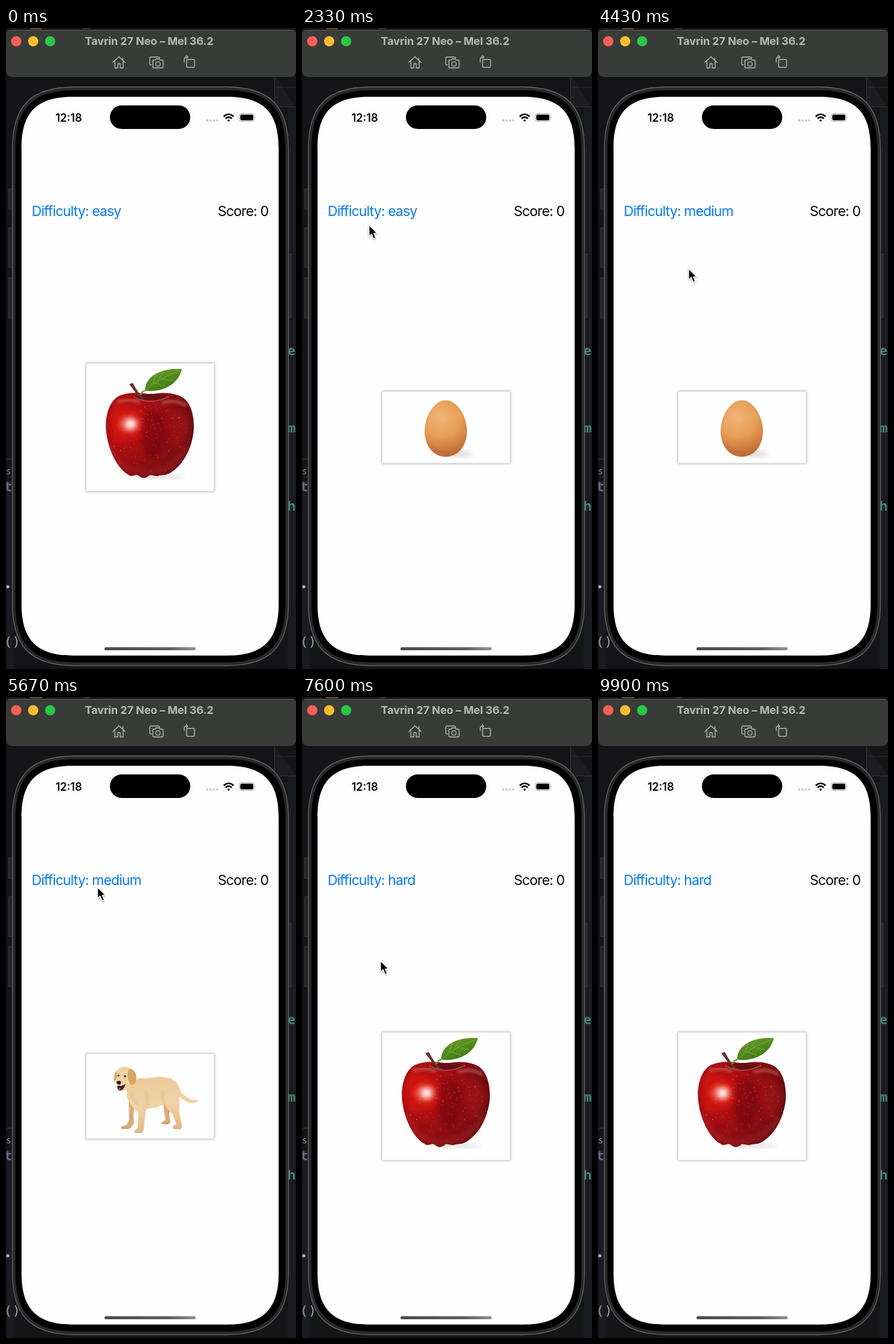
An HTML page for the animation above (9.93 s loop, 480 by 1060 pixels).

```html
<!DOCTYPE html>
<html lang="en">
<head>
<meta charset="utf-8">
<title>Card game in a phone simulator</title>
<style>
  html, body { margin: 0; width: 100%; height: 100%; overflow: hidden; background: #151517; }
  svg { display: block; width: 100%; height: 100%; }
  text { font-family: Inter, Roboto, sans-serif; white-space: pre; }
  .code text { font: 600 22px "Noto Sans Mono", "DejaVu Sans Mono", monospace; }
  .label { font-size: 23px; letter-spacing: -.039em; }
  .item { font-size: 18px; letter-spacing: -.036em; fill: #111; }
  .icon { fill: none; stroke: #b9bab9; stroke-width: 1.4; stroke-linejoin: round; stroke-linecap: round; }
</style>
</head>
<body>
<svg viewBox="0 0 480 1060" preserveAspectRatio="none">
  <defs>
    <radialGradient id="appleSkin" gradientUnits="userSpaceOnUse" cx="200" cy="652" r="116">
      <stop offset="0" stop-color="#cc1614"/><stop offset=".3" stop-color="#b01013"/>
      <stop offset=".65" stop-color="#8f0d12"/><stop offset="1" stop-color="#650d10"/>
    </radialGradient>
    <linearGradient id="leafSkin" x1="0" y1="0" x2=".6" y2="1">
      <stop offset="0" stop-color="#6f9f2a"/><stop offset="1" stop-color="#3d7a14"/>
    </linearGradient>
    <radialGradient id="eggSkin" gradientUnits="userSpaceOnUse" cx="231" cy="645" r="62">
      <stop offset="0" stop-color="#f1b57b"/><stop offset=".5" stop-color="#e79e55"/>
      <stop offset="1" stop-color="#c06b34"/>
    </radialGradient>
    <linearGradient id="coat" x1="0" y1="0" x2=".2" y2="1">
      <stop offset="0" stop-color="#ecc794"/><stop offset=".55" stop-color="#f1d4aa"/>
      <stop offset="1" stop-color="#e3b983"/>
    </linearGradient>
    <linearGradient id="homeBar">
      <stop offset="0" stop-color="#4b4b4b"/><stop offset=".7" stop-color="#5f5f5f"/><stop offset="1" stop-color="#929292"/>
    </linearGradient>
    <filter id="soft" x="-50%" y="-50%" width="200%" height="200%"><feGaussianBlur stdDeviation="4"/></filter>
    <filter id="edge" x="-10%" y="-10%" width="120%" height="120%"><feGaussianBlur stdDeviation="2.2"/></filter>
    <filter id="glow" filterUnits="userSpaceOnUse" x="-120" y="170" width="600" height="460"><feGaussianBlur stdDeviation="36"/></filter>
    <filter id="cursorShade" x="-50%" y="-50%" width="200%" height="200%">
      <feDropShadow dx="0" dy="1.2" stdDeviation="1" flood-opacity=".4"/>
    </filter>
    <clipPath id="screenShape"><use href="#screen"/></clipPath>
    <clipPath id="appleShape"><use href="#appleBody"/></clipPath>
  </defs>

  <!-- Desktop behind the simulator -->
  <rect width="480" height="1060" fill="#151517"/>
  <path d="M0 750H12V1060H0zM466 130H480V1060H466z" fill="#1a1c22"/>
  <path d="M40 0h19v2h-19z" fill="#704820"/><path d="M127 0h11v1.5h-11z" fill="#3c3d40"/>
  <path d="M444.500 81V130.500H480M444.500 98H480" fill="#1d1d20" stroke="#323235"/>
  <path d="M14 266H4.500V300H14M14 330.500H4.500V396H14M14 413H4.500V479H14M464 374H472V479H464" fill="#242426" stroke="#3d3d40"/>
  <path d="M0 713H12M0 750.500H12" stroke="#38383b"/>
  <g class="code">
    <text x="0" y="738" style="font-size:14px;font-weight:400" fill="#99999c">s</text>
    <text x="-3" y="766" fill="#75608f">t</text>
    <circle cx="3" cy="924" r="2.600" fill="#b8b8bb"/>
    <text x="-3" y="1022" fill="#a3a3a6" style="font-weight:400">()</text>
    <g fill="#4c8574"><text x="466" y="541">e</text><text x="466" y="669">m</text><text x="466" y="798">h</text></g>
  </g>

  <!-- Title bar -->
  <path d="M0 8Q2 3 9 3H471Q478 3 480 8V72Q479 81 469 81H11Q1 81 0 72Z" fill="#393b38"/>
  <path d="M4 4Q6 3.500 10 3.500H470Q474 3.500 476 4" fill="none" stroke="#5d5e5d"/>
  <circle cx="17" cy="22" r="8.500" fill="#ff5f57"/>
  <circle cx="45" cy="22" r="8.500" fill="#febc2e"/>
  <circle cx="73" cy="22" r="8.500" fill="#28c840"/>
  <text x="237" y="28" text-anchor="middle" font-size="18" font-weight="700" letter-spacing="-.1" fill="#b7b8b7">Tavrin 27 Neo – Mel 36.2</text>
  <g class="icon">
    <path d="M177 57L187 47.500 197 57M180 55V66H185V59H189V66H194V55M193.500 53V49"/>
    <path d="M241 61H240Q238 61 238 59V50Q238 48 240 48H252Q254 48 254.500 50M245 53H247L248.500 51H253.500L255 53H258Q260 53 260 55V64Q260 66 258 66H245Q243 66 243 64V55Q243 53 245 53Z"/>
    <circle cx="251.500" cy="59.500" r="3.700"/>
    <rect x="299" y="52" width="13" height="13" rx="2"/><path d="M295 56V52Q295 48 299 48H301M298.500 45.500L301 48 298.500 50.500"/>
  </g>

  <!-- Phone -->
  <path id="frame" fill="#292a2b" stroke="#656666" stroke-width="1.300"/>
  <path id="bezel" stroke="#161616"/>
  <path id="screen" fill="#fefefe"/>
  <rect x="172" y="128" width="133" height="39" rx="19.500"/>
  <text x="82" y="154.500" font-size="18" font-weight="600">12:18</text>
  <g fill="#c9c9c9"><circle cx="333" cy="153" r="1.900"/><circle cx="338.600" cy="153" r="1.900"/><circle cx="344.200" cy="153" r="1.900"/><circle cx="349.800" cy="153" r="1.900"/></g>
  <g fill="none" stroke="#000" stroke-width="2.500">
    <path d="M360.200 146.500Q368.500 139 376.800 146.500M363.200 149.800Q368.500 145 373.800 149.800"/>
    <path d="M366 152.500Q368.500 150.500 371 152.500L368.500 155Z" fill="#000" stroke="none"/>
  </g>
  <rect x="386" y="141.500" width="25" height="13" rx="4" fill="none" stroke="#aaa"/>
  <rect x="387.700" y="143.200" width="21.600" height="9.600" rx="2.700"/>
  <path d="M412.500 146Q414.500 148 412.500 150Z" fill="#aaa"/>
  <rect x="163" y="1024" width="151" height="5" rx="2.500" fill="url(#homeBar)"/>
  <text class="label" x="350.500" y="311">Score: 0</text>

  <!-- Cards -->
  <rect id="cardShade" x="132" width="213" fill="#000" opacity=".3" filter="url(#edge)"/>
  <rect id="cardFace" x="133" width="211" fill="#fefefe"/>

  <g class="picture">
    <ellipse cx="252" cy="742" rx="44" ry="2.500" fill="#777" opacity=".35" filter="url(#soft)"/>
    <path id="appleBody" fill="url(#appleSkin)" d="M239 606C220 602 202 602 188 608C171 616 164 641 165.500 664C168 696 184 729 203 739C209 744 214 737 219 740C226 746 232 745 237 740C242 738 247 743 254 740C262 739 267 739 273 735C295 721 309 692 311 662C311.500 636 304 613 284 607C269 602 254 603 239 606Z"/>
    <g clip-path="url(#appleShape)">
      <path d="M222 640C236 626 252 630 262 646C268 672 262 704 240 716C224 700 216 664 222 640Z" fill="#5a060b" opacity=".4" filter="url(#soft)"/>
      <path d="M272 632C290 628 303 640 304 662C301 682 292 696 280 700C276 676 270 650 272 632Z" fill="#b51a1b" opacity=".4" filter="url(#soft)"/>
      <path d="M183 620C172 636 170 664 180 688L226 676 230 636Z" fill="#e0170f" opacity=".5" filter="url(#soft)"/>
      <path d="M172 690C184 724 202 734 222 734C250 738 282 728 300 692" fill="none" stroke="#bb3236" stroke-width="9" opacity=".4" filter="url(#soft)"/>
      <ellipse cx="204" cy="655" rx="17" ry="14" fill="#ff8070" opacity=".6" filter="url(#soft)"/>
      <ellipse cx="206" cy="655" rx="9" ry="8" fill="#fff" opacity=".95" filter="url(#soft)"/>
      <path d="M184 618Q207 611 222 619M258 620Q281 613 299 625" fill="none" stroke="#f0a598" stroke-width="5" opacity=".4" filter="url(#edge)"/>
      <g id="speckles" fill="#f0a58c"/>
    </g>
    <ellipse cx="240" cy="611" rx="28" ry="6" fill="#671014"/>
    <path d="M211 610Q240 625 270 609" fill="none" stroke="#c9685a" stroke-width="2" opacity=".6"/>
    <path d="M204 589L210 587Q217 602 230 615L224 614Q214 603 204 589Z" fill="#663034"/>
    <path d="M222 607Q224 602 231 599" fill="none" stroke="#6f9c2c" stroke-width="2.400"/>
    <path d="M230 600C230 578 252 562 291 564C287 584 266 603 230 600Z" fill="url(#leafSkin)"/>
    <path d="M230 600Q249 581 288 566M243 588L248 573M254 579L261 568M246 587L263 592M257 580L276 583" fill="none" stroke="#a0cb5f" opacity=".5"/>
  </g>

  <g class="picture">
    <ellipse cx="262" cy="704" rx="20" ry="4" fill="#8a8088" opacity=".35" filter="url(#soft)"/>
    <path fill="url(#eggSkin)" d="M238 615.500C257 615.500 273 642 273 666C273 692 258 709 238 709C218 709 203 692 203 666C203 642 219 615.500 238 615.500Z"/>
    <path d="M206 681C212 698 224 707 239 708C250 708 260 702 266 692C251 704 224 703 206 681Z" fill="#b56843" opacity=".4" filter="url(#edge)"/>
  </g>

  <g class="picture">
    <g fill="#d9ac77">
      <path d="M203 666L213 668 211 692 212 704 206 713Q196 716 190 713 190 709 199 708L204 700Z"/>
      <path d="M260 670L276 676 270 688 272 704 267 707Q258 707 257 704L264 699 262 687Z"/>
    </g>
    <path fill="url(#coat)" d="M200 646C210 640 214 632 222 630C240 632 249 626 263 629C278 630 287 640 289 652C296 662 307 667 318 667C318 671 306 673 298 669L287 661C289 673 285 679 287 688L291 708Q292 713 288 714L278 714Q274 712 277 709L282 706 276 690Q267 682 262 673C251 680 241 680 232 681L229 704 228 717Q224 722 213 720 212 716 218 713L219 689C213 680 204 674 200 662Z"/>
    <path d="M181 624C183 615 190 611 199 612C208 613 213 619 213 628C213 635 211 640 207 647L194 651Q184 650 183 643Z" fill="#f1d1a1"/>
    <path d="M203 616C210 613 216 621 216 631Q214 642 207 642Q201 633 201 624ZM182 618Q178 625 179 636Q183 635 184 624Z" fill="#d9a565"/>
    <path d="M183 637Q187 633 193 638L195 646 190 650 184 648Z" fill="#f5dfc0"/>
    <path d="M182.500 637Q184 634 189 635 192 637 189 641 185 642 182.500 637Z" fill="#211a1a"/>
    <path d="M184 643L191 643 198 640Q195 650 189 651 184 650 184 643Z" fill="#4a2020"/>
    <path d="M185.500 647.500L189.500 647 189 650Z" fill="#c9787a"/>
    <circle cx="186" cy="626" r="1.500" fill="#31201a"/><circle cx="197" cy="627" r="1.700" fill="#31201a"/>
    <path d="M230 652Q240 674 228 681M261 650Q257 664 264 675M208 655Q211 668 220 676" fill="none" stroke="#c8985d" stroke-width="3" opacity=".35" filter="url(#edge)"/>
    <path d="M190 713h15M213 720h14M257 705h13M277 714h13" stroke="#9b7658" opacity=".6"/>
  </g>

  <text class="label" id="difficulty" x="42.500" y="311"></text>

  <g clip-path="url(#screenShape)">
    <g id="menu">
      <rect x="14" y="305.500" width="305" height="179.500" rx="33" opacity=".11" filter="url(#glow)"/>
      <rect x="34" y="325.500" width="265" height="139.500" rx="13" fill="#f5f6f6"/>
      <path d="M34 372H299M34 418.500H299" stroke="#d9dada"/>
      <text class="item" x="51" y="355.500">Easy</text>
      <text class="item" x="51" y="402">Medium</text>
      <text class="item" x="51" y="448.500">Hard</text>
    </g>
  </g>

  <g id="cursor" filter="url(#cursorShade)">
    <path d="M0 0V18.500L4.300 14.500 7.500 22.300 11 20.800 7.800 13.300H13.200Z" stroke="#fff" stroke-width="1.300" stroke-linejoin="round"/>
  </g>
</svg>
<script>
const LOOP = 9930;
const $ = id => document.getElementById(id);
const pictures = [...document.querySelectorAll('.picture')];   // apple, egg, dog
const deck = [
  { picture: pictures[0], height: 211 },
  { picture: pictures[2], height: 140 },
  { picture: pictures[1], height: 118 },
];
// The card timer restarts whenever a level is chosen.
const levels = [
  { name: 'easy', from: -200, period: 1000, dealt: 0 },
  { name: 'medium', from: 3870, period: 500, dealt: 4 },
  { name: 'hard', from: 7030, period: 200, dealt: 10 },
];
const menuSpans = [[2900, 3890], [6130, 7050]];
const cursorPath = [   // time, x, y
  [1930, 250, 1062], [2300, 111, 326], [2620, 111, 326], [2820, 109, 304], [3000, 109, 304],
  [3600, 125, 393], [3950, 125, 393], [4230, 150, 398], [4870, 150, 398], [5500, 151.500, 314.500],
  [5870, 151.500, 314.500], [6020, 150, 303], [6250, 150, 303], [6800, 123, 431.500],
  [7250, 123, 431.500], [7700, 131, 437], [8070, 131, 437], [8400, 298, 443], [8500, 300, 440], [8900, 484, 58],
];

const clamp = v => Math.min(1, Math.max(0, v));
const mix = (a, b, k) => a + (b - a) * k;
const smooth = k => k * k * (3 - 2 * k);
const easeOut = k => 1 - (1 - k) ** 4;

// Rounded box whose corners flow into the sides, as on a phone.
function continuousBox(x, y, w, h, reach) {
  const near = reach * .3, far = reach - near, r = reach;
  return `M${x + r} ${y}h${w - 2 * r}c${far} 0 ${r} ${near} ${r} ${r}v${h - 2 * r}` +
    `c0 ${far} ${-near} ${r} ${-r} ${r}h${2 * r - w}c${-far} 0 ${-r} ${-near} ${-r} ${-r}` +
    `v${2 * r - h}c0 ${-far} ${near} ${-r} ${r} ${-r}z`;
}

function buildPhone() {
  $('frame').setAttribute('d', continuousBox(10.5, 97.5, 457, 957, 103));
  $('bezel').setAttribute('d', continuousBox(15.5, 103, 447, 946, 97));
  $('screen').setAttribute('d', continuousBox(25.7, 113.7, 425.6, 924, 85));
}

function addSpeckles() {
  let seed = 7;
  const random = () => (seed = seed * 16807 % 2147483647) / 2147483647;
  let dots = '';
  for (let i = 0; i < 170; i++) {
    const angle = random() * 2 * Math.PI, reach = Math.sqrt(random());
    const x = 239 + 68 * reach * Math.cos(angle), y = 680 + 57 * reach * Math.sin(angle);
    dots += `<circle cx="${x}" cy="${y}" r="${.35 + random() * .45}" opacity="${.2 + random() * .45}"/>`;
  }
  $('speckles').innerHTML = dots;
}

function menuOpenness(t) {
  return Math.max(...menuSpans.map(([open, close]) =>
    t < close ? easeOut(clamp((t - open) / 380)) : 1 - easeOut(clamp((t - close) / 340))));
}

function drawCard(level, t) {
  const count = level.dealt + Math.floor((t - level.from) / level.period);
  const { picture, height } = deck[count % deck.length];
  pictures.forEach(p => p.style.display = p === picture ? '' : 'none');
  for (const [id, grow] of [['cardFace', 0], ['cardShade', 2]]) {
    $(id).setAttribute('y', 660.3 - (height + grow) / 2);
    $(id).setAttribute('height', height + grow);
  }
}

function drawMenu(level, t) {
  const open = menuOpenness(t), scale = mix(.2, 1, open);
  $('menu').setAttribute('opacity', clamp(open * 1.3));
  $('menu').setAttribute('transform', `translate(115 325) scale(${scale}) translate(-115 -325)`);
  $('difficulty').textContent = 'Difficulty: ' + level.name;
  $('difficulty').setAttribute('fill', `rgb(${mix(8, 178, open)},${mix(122, 208, open)},${mix(240, 238, open)})`);
}

function drawCursor(t) {
  const next = cursorPath.findIndex(([time]) => time > t);
  $('cursor').style.display = next > 0 ? '' : 'none';
  if (next < 1) return;
  const [t0, x0, y0] = cursorPath[next - 1], [t1, x1, y1] = cursorPath[next];
  const k = smooth((t - t0) / (t1 - t0));
  $('cursor').setAttribute('transform', `translate(${mix(x0, x1, k)} ${mix(y0, y1, k)})`);
}

function draw() {
  const t = (performance.now() - start) % LOOP;
  const level = levels.findLast(l => t >= l.from);
  drawCard(level, t);
  drawMenu(level, t);
  drawCursor(t);
  requestAnimationFrame(draw);
}

buildPhone();
addSpeckles();
const start = performance.now();
draw();
</script>
</body>
</html>
```
